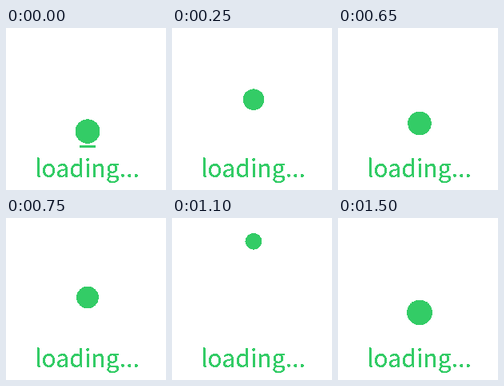
These frames come from a looping animation (200 by 203 pixels, 1550 ms). An HTML page:

```html
<!DOCTYPE html>
<html lang="en">
<head>
<meta charset="utf-8">
<title>Loading</title>
<style>
  html, body { margin: 0; width: 100%; height: 100%; overflow: hidden; background: #fff; }
  svg { display: block; width: 100vw; height: 100vh; }
  text { font: 30.2px "Noto Sans CJK SC", "Noto Sans CJK JP", "Noto Sans CJK", sans-serif; }
</style>
</head>
<body>
<svg viewBox="0 0 200 203" fill="#33cc66">
  <!-- hard, unsmoothed edges -->
  <filter id="crisp" filterUnits="userSpaceOnUse" x="0" y="0" width="200" height="203"
          color-interpolation-filters="sRGB">
    <feComponentTransfer><feFuncA type="linear" slope="40" intercept="-14"/></feComponentTransfer>
  </filter>
  <g filter="url(#crisp)">
    <circle id="ball" cx="102"/>
    <rect id="floor" x="92" y="147" width="20" height="3"/>
    <text x="35.9" y="187">loading...</text>
  </g>
</svg>
<script>
  const STEP = 50, LOOP = 1550, GROUND = 129.6;
  const ball = document.getElementById('ball');
  const ground = document.getElementById('floor');

  // [step, height above ground, radius]
  const keys = [
    [0, 0, 15.2],
    [8, 64, 12],
    [12, 0, 15.2],
    [22, 100.4, 10.3],
    [31, 0, 16.4]
  ];

  const mix = (a, b, k) => a + (b - a) * k;

  function draw(ms) {
    const step = Math.floor((ms % LOOP) / STEP);
    const i = keys.findIndex(key => key[0] > step);
    const a = keys[i - 1], b = keys[i];
    const k = (step - a[0]) / (b[0] - a[0]);
    const height = mix(a[1], b[1], k);
    ball.setAttribute('cy', GROUND - height);
    ball.setAttribute('r', mix(a[2], b[2], k));
    ground.setAttribute('visibility', height === 0 ? 'visible' : 'hidden');
  }

  let start;
  function tick(now) {
    start ??= now;
    draw(Math.max(0, now - start));
    requestAnimationFrame(tick);
  }
  draw(0);
  requestAnimationFrame(tick);
</script>
</body>
</html>
```
